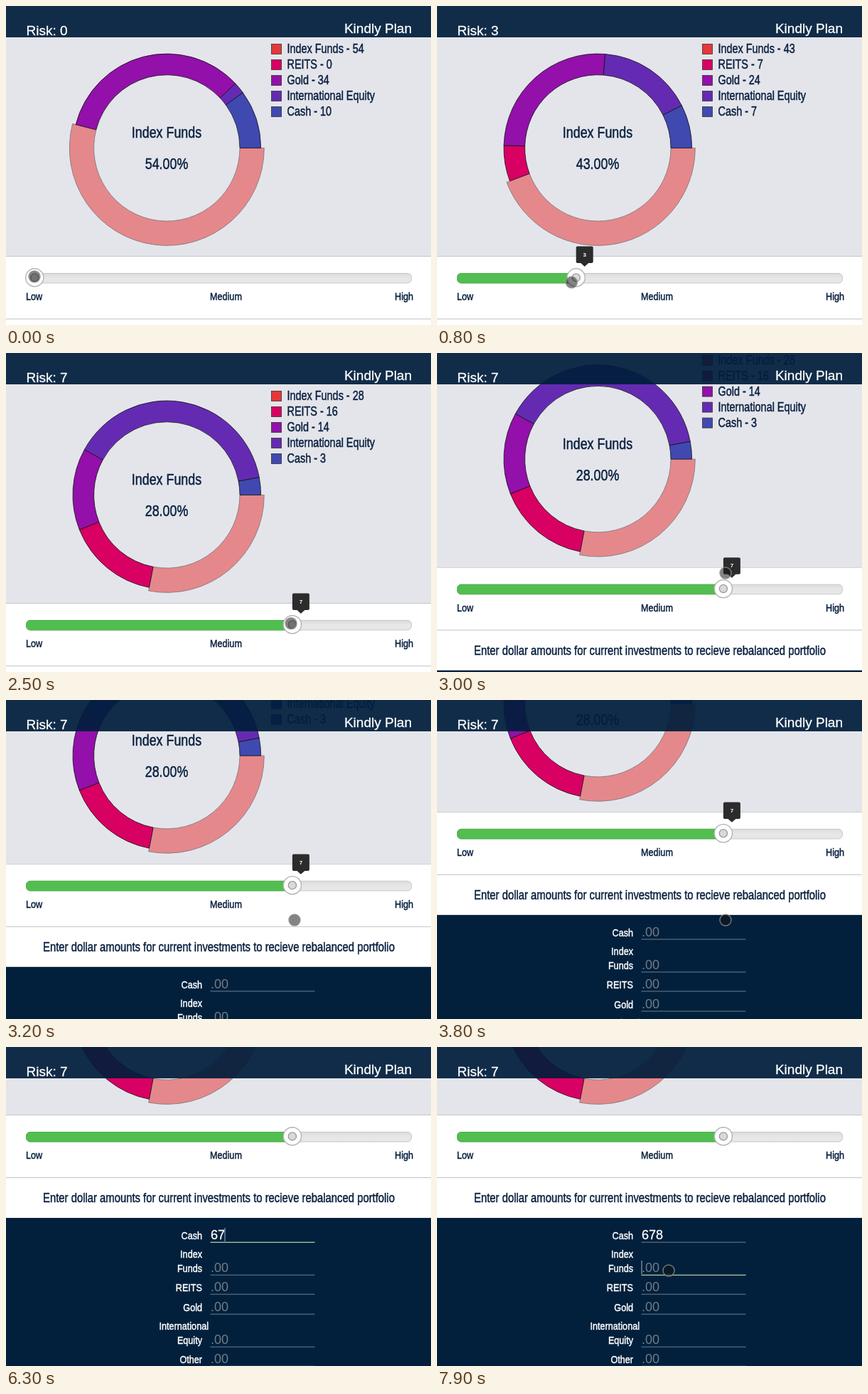
Recreate the animation shown at these times as an HTML page. Size 598 by 448 pixels, loop 8 s.

```html
<!DOCTYPE html>
<html lang="en">
<head>
<meta charset="utf-8">
<title>Portfolio planner</title>
<style>
  html, body { margin: 0; width: 100%; height: 100%; overflow: hidden; background: #fff; }
  svg { display: block; width: 598px; height: 448px; font-family: "Liberation Sans", Arial, sans-serif; }
</style>
</head>
<body>
<svg id="stage" viewBox="0 0 598 448">
  <defs>
    <linearGradient id="trackFill" x2="0" y2="1">
      <stop offset="0" stop-color="#dcdcdc"/><stop offset=".5" stop-color="#e7e7e7"/>
    </linearGradient>
    <clipPath id="legendClip"><rect x="360" y="40" width="160" height="130"/></clipPath>
  </defs>
</svg>
<script>
const LOOP = 8000, NAVY = '#0a2140', DARK = '#02203c';
const CX = 226.3, CY = 199.4, INNER = 102.7;
const NAMES = ['Index Funds', 'REITS', 'Gold', 'International Equity', 'Cash'];
const COLORS = ['#e6373a', '#d80062', '#9310aa', '#642bb2', '#4049b0'];
// Shares at risk levels 0, 5 and 7; international equity takes the rest.
const SHARES = [[0, 54, 0, 34, 10], [5, 35, 12, 18, 5], [7, 28, 16, 14, 3]];

const SCROLL = [[2850, 0], [3000, 50], [3200, 121], [3400, 160], [3800, 194],
  [4100, 238], [4400, 255], [5300, 255], [5500, 256]];
const POINTER = [[100, 40, 380], [1400, 317, 395], [1805, 401, 380], [2500, 401, 380],
  [2800, 406, 309], [3900, 406, 309], [4400, 320, 265], [4600, 320, 265],
  [4900, 300, 324], [5500, 340, 318], [7200, 340, 318], [7700, 326, 314]];
const KEYS = [6000, 6200, 6500];
const CLICK_CASH = 4500, CLICK_FUNDS = 7900;

const stage = document.getElementById('stage');

function el(tag, attrs, parent = stage) {
  const node = document.createElementNS('http://www.w3.org/2000/svg', tag);
  set(node, attrs);
  return parent.appendChild(node);
}
function set(node, attrs) {
  for (const k in attrs) node.setAttribute(k, attrs[k]);
}
function text(str, x, y, size, fill, parent, anchor = 'start') {
  const node = el('text', { x, y, 'font-size': size, fill, 'text-anchor': anchor }, parent);
  node.textContent = str;
  return node;
}
// A thin outline gives the type a little more weight.
function thicken(node, color, width) {
  set(node, { stroke: color, 'stroke-width': width });
  return node;
}
// One narrow face for all page copy.
function narrow(str, x, y, size, fill, parent, anchor) {
  const node = text(str, 0, 0, size, fill, parent, anchor);
  set(node, { transform: `translate(${x} ${y}) scale(.82 1)` });
  return thicken(node, fill, .5);
}
function show(node, on) { set(node, { opacity: +on }); }

// Piecewise linear track: rows of [position, ...values].
function along(rows, t) {
  if (t <= rows[0][0]) return rows[0].slice(1);
  for (let i = 1; i < rows.length; i++) {
    const a = rows[i - 1], b = rows[i];
    if (t <= b[0]) {
      const p = (t - a[0]) / (b[0] - a[0]);
      return a.slice(1).map((v, j) => v + (b[j + 1] - v) * p);
    }
  }
  return rows[rows.length - 1].slice(1);
}

function shares(risk, round) {
  let s = along(SHARES, risk);
  if (round) s = s.map(Math.round);
  const [index, reits, gold, cash] = s;
  return [index, reits, gold, 100 - index - reits - gold - cash, cash];
}
function riskAt(t) {
  const x = along(POINTER, Math.min(t, 2000))[0];
  return Math.max(0, Math.min(7, Math.round((x - 40.3) / 51.8)));
}
// The ring trails the slider by a short transition.
function easedRisk(t) {
  let sum = 0;
  for (let i = 0; i < 18; i++) sum += riskAt(t - i * 10);
  return sum / 18;
}
function slicePath(from, to, outer) {
  const at = (share, r) => {
    const a = share * Math.PI / 50;
    return `${(CX + r * Math.cos(a)).toFixed(2)} ${(CY + r * Math.sin(a)).toFixed(2)}`;
  };
  const big = to - from > 50 ? 1 : 0;
  return `M${at(from, outer)}A${outer} ${outer} 0 ${big} 1 ${at(to, outer)}` +
    `L${at(to, INNER)}A${INNER} ${INNER} 0 ${big} 0 ${at(from, INNER)}Z`;
}

// Page sections
const page = el('g', {});
el('rect', { width: 598, height: 351, fill: '#e4e5eb' }, page);
el('rect', { y: 351, width: 598, height: 145, fill: '#fff' }, page);
for (const y of [351, 439]) el('rect', { y, width: 598, height: 1, fill: '#c2c4c8' }, page);
el('rect', { y: 496, width: 598, height: 300, fill: DARK }, page);

// Ring
const slices = COLORS.map((fill, i) => el('path', {
  fill, stroke: '#111', 'stroke-width': .8, opacity: i ? 1 : .53
}, page));
narrow('Index Funds', 226, 185, 21.8, NAVY, page, 'middle');
const percent = narrow('', 226, 229, 21.8, NAVY, page, 'middle');

// Legend
const legend = el('g', { 'clip-path': 'url(#legendClip)' }, page);
const entries = COLORS.map((fill, i) => {
  el('rect', { x: 373.5, y: 53.5 + i * 22, width: 14, height: 14, fill, stroke: '#333', 'stroke-width': .8 }, legend);
  return narrow('', 395.5, 66 + i * 22, 17.6, NAVY, legend);
});

// Slider
el('rect', { x: 28.5, y: 375.5, width: 542, height: 13.6, rx: 5.5, fill: 'url(#trackFill)', stroke: '#c8c8c8' }, page);
const bar = el('rect', { x: 28.5, y: 375.5, height: 13.6, rx: 5.5, fill: '#52be50', stroke: '#4bb04a' }, page);
const handle = el('g', {}, page);
el('circle', { r: 12.6, fill: '#fff', stroke: '#b4b4b4', 'stroke-width': 1.4 }, handle);
el('circle', { r: 5.6, fill: '#d9d9d9', stroke: '#999', 'stroke-width': 1.3 }, handle);
const tip = el('g', {}, page);
el('rect', { x: -12, y: 337.6, width: 24, height: 23.5, rx: 2, fill: '#2c2c2c' }, tip);
el('path', { d: 'M-6 360.600H6L0 366Z', fill: '#2c2c2c' }, tip);
const tipText = text('', 0, 351.8, 8, '#fff', tip, 'middle');
set(tipText, { 'font-weight': 700 });
narrow('Low', 28, 413, 15.4, NAVY, page);
narrow('Medium', 287, 413, 15.4, NAVY, page);
narrow('High', 573, 413, 15.4, NAVY, page, 'end');

narrow('Enter dollar amounts for current investments to recieve rebalanced portfolio',
  299.5, 474, 18.1, NAVY, page, 'middle');

// Form
const fields = [['Cash', 526], ['Index Funds', 572], ['REITS', 599], ['Gold', 627],
  ['International Equity', 673], ['Other', 700]].map(([label, y]) => {
  const words = label.split(' ');
  words.forEach((word, i) => {
    const wide = word.length > 10;
    narrow(word, wide ? 215.5 : 276, y - 20 * (words.length - 1 - i), 15.4, '#fff', page, wide ? 'start' : 'end');
  });
  return {
    value: text('.00', 288, y, 18, '#717c87', page),
    line: el('rect', { x: 287.5, y: y + 3.7, width: 147, height: 1 }, page),
    caret: el('rect', { x: 287.5, y: y - 16, width: 1, height: 19, fill: '#aab3bb' }, page)
  };
});

// Fixed header and pointer
el('rect', { width: 598, height: 44, fill: '#001e3c', opacity: .925 });
const riskText = thicken(text('', 28.5, 41, 19, '#fff'), '#fff', .3);
thicken(text('Kindly Plan', 571, 38, 19, '#fff', stage, 'end'), '#fff', .3);
const pointer = el('circle', { r: 8, fill: 'rgba(20,20,20,.52)', stroke: 'rgba(140,140,140,.8)', 'stroke-width': 1.5 });

function draw(t) {
  const risk = riskAt(t), x = 40.3 + 51.8 * risk, whole = shares(risk, true);

  let from = 0;
  shares(easedRisk(t)).forEach((share, i) => {
    set(slices[i], { d: slicePath(from, from + share, i ? 132.3 : 137) });
    show(slices[i], share > .01 ? (i ? 1 : .53) : 0);
    from += share;
  });
  percent.textContent = whole[0].toFixed(2) + '%';
  entries.forEach((node, i) => { node.textContent = `${NAMES[i]} - ${whole[i]}`; });

  set(bar, { width: x - 28.5 });
  show(bar, risk > 0);
  set(handle, { transform: `translate(${x} 381.4)` });
  set(tip, { transform: `translate(${x + 12} 0)` });
  show(tip, t < 100 ? 0 : Math.max(0, Math.min(1, 1 - (t - CLICK_CASH) / 200)));
  tipText.textContent = risk;
  riskText.textContent = 'Risk: ' + risk;

  const typed = KEYS.filter(k => t >= k).length;
  const focus = t >= CLICK_FUNDS ? 1 : t >= CLICK_CASH ? 0 : -1;
  const since = t - (focus === 1 ? CLICK_FUNDS : typed ? KEYS[typed - 1] : CLICK_CASH);
  fields.forEach((f, i) => {
    set(f.line, { fill: i === focus ? '#a9c9a6' : '#6c7f90', height: i === focus ? 1.3 : 1 });
    show(f.caret, i === focus && since % 1000 < 500);
  });
  const cash = fields[0];
  cash.value.textContent = typed ? '678'.slice(0, typed) : '.00';
  set(cash.value, { fill: typed ? '#fff' : '#717c87' });
  thicken(cash.value, '#fff', typed ? .3 : 0);
  set(cash.caret, { x: 287.5 + typed * 10 });

  set(page, { transform: `translate(0 ${-along(SCROLL, t)[0]})` });
  const [px, py] = along(POINTER, t);
  set(pointer, { cx: px, cy: py });
  show(pointer, t < KEYS[0] || t >= 7200);
}

const start = performance.now();
function tick() {
  draw((performance.now() - start) % LOOP);
  requestAnimationFrame(tick);
}
tick();
</script>
</body>
</html>
```
